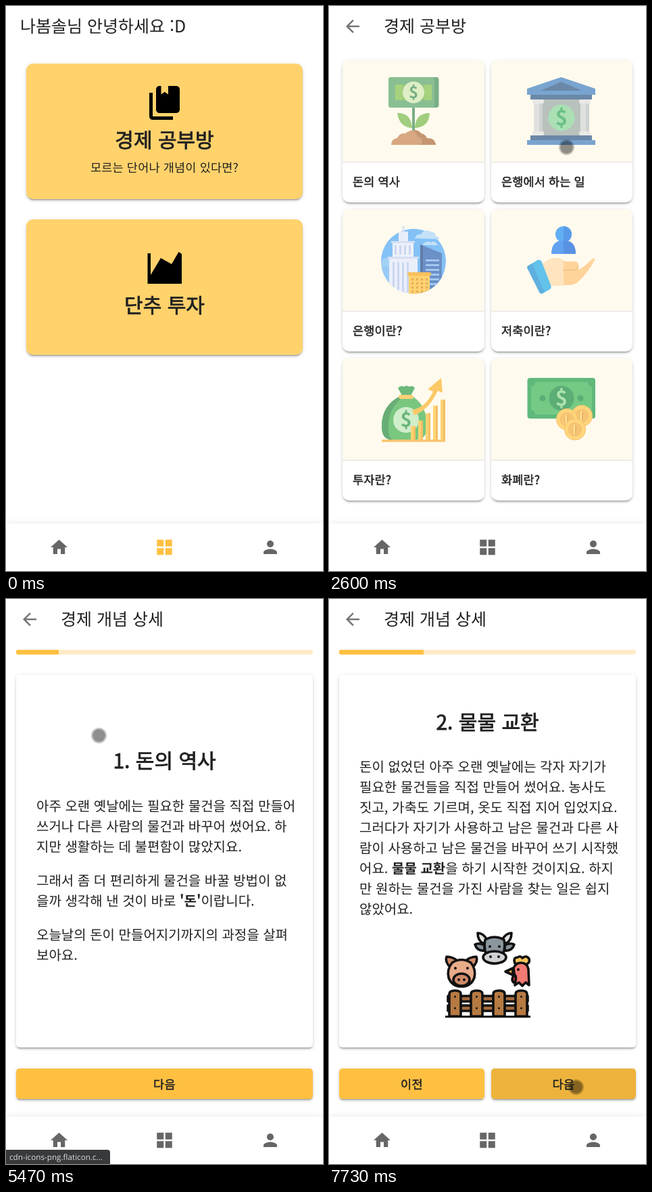
Recreate the animation shown at these times as an HTML page. Size 469 px wide and 834 px high, loop 8 s.

```html
<!DOCTYPE html>
<html lang="ko">
<head>
<meta charset="utf-8">
<style>
html, body { margin: 0; width: 100%; height: 100%; overflow: hidden; background: #fff; }
#stage { position: relative; width: 469px; height: 834px; overflow: hidden; background: #fff; text-rendering: geometricPrecision; }
#stage div, #stage svg { position: absolute; }
#stage svg { left: 0; top: 0; width: 469px; height: 834px; }
.screen { left: 0; top: 0; width: 469px; height: 834px; }
.box { overflow: hidden; box-sizing: border-box; }
.up, .btn { box-shadow: 0 3.75px 1.25px -2.5px #0003, 0 2.5px 2.5px #00000024, 0 1.25px 6.25px #0000001f; }
.btn { border-radius: 5px; background: #ffc042; }
.ripple { border-radius: 50%; background: #000; }
text { font-family: "Noto Sans CJK KR", "Noto Sans KR", "Noto Sans CJK", sans-serif; fill: #212121; text-rendering: geometricPrecision; }
.mid { text-anchor: middle; }
.medium { stroke: #212121; stroke-width: .028em; }
#nav { left: 0; top: 764px; width: 469px; height: 70px; background: #fff; box-shadow: 0 0 10px #0000001a; }
#status { left: 0; top: 813px; width: 154px; height: 21px; background: #38393b; border-top-right-radius: 4px; }
#status span { position: absolute; left: 5px; top: 3px; font: 11.7px/16px "Open Sans", sans-serif; color: #dcdcdc; white-space: nowrap; }
#cursor { width: 23px; height: 23px; border-radius: 50%; box-sizing: border-box;
  border: 2px solid #00000038; background: #00000070; background-clip: padding-box; }
</style>
</head>
<body>
<div id="stage"></div>
<script>
const stage = document.getElementById('stage');
const box = (x, y, w, h, cls = '', css = '', inner = '') =>
  `<div class="box ${cls}" style="left:${x}px;top:${y}px;width:${w}px;height:${h}px;${css}">${inner}</div>`;
const text = (x, y, size, str, cls = '', extra = '') =>
  `<text x="${x}" y="${y}" font-size="${size}" class="${cls}" ${extra}>${str}</text>`;
const rect = (x, y, w, h, fill, r = 0, extra = '') =>
  `<rect x="${x}" y="${y}" width="${w}" height="${h}" rx="${r}" fill="${fill}" ${extra}/>`;
const disc = (x, y, r, fill, extra = '') => `<circle cx="${x}" cy="${y}" r="${r}" fill="${fill}" ${extra}/>`;
const path = (d, fill, extra = '') => `<path d="${d}" fill="${fill}" ${extra}/>`;
const line = (d, color, w) => path(d, 'none', `stroke="${color}" stroke-width="${w}"`);
const icon = (x, y, k, d, fill, id = '') => `<path id="${id}" transform="translate(${x} ${y}) scale(${k})" d="${d}" fill="${fill}"/>`;
const dollar = (x, y, size, fill) => text(x, y + size * .36, size, '$', 'mid', `font-weight="700" style="fill:${fill}"`);
const svg = s => `<svg viewBox="0 0 469 834">${s}</svg>`;
const screen = (id, html) => `<div class="screen" id="${id}">${html}</div>`;
const ripple = id => `<div class="ripple" id="${id}"></div>`;
const back = icon(20, 15, 1.25, 'M20 11H7.83l5.59-5.59L12 4l-8 8 8 8 1.41-1.41L7.83 13H20z', '#757575');

const home = screen('home',
  box(30, 85, 409, 200, 'up', 'background:#ffd26c;border-radius:10px', ripple('ripHome')) +
  box(30, 315, 409, 200, 'up', 'background:#ffd26c;border-radius:10px') +
  svg(text(21, 39, 25, '나봄솔님 안녕하세요 :D') +
    icon(204.5, 113, 2.5, 'M3 6h2v14h12v2H5c-1.1 0-2-.9-2-2zM9 2h1v5l2.1-1.5 2.1 1.5V2H19c1.1 0 2 .9 2 2v12c0 1.1-.9 2-2 2H9c-1.1 0-2-.9-2-2V4c0-1.1.9-2 2-2z', '#000') +
    text(234.5, 209, 30, '경제 공부방', 'mid medium') +
    text(234.5, 244.5, 17.5, '모르는 단어나 개념이 있다면?', 'mid', 'letter-spacing=".187"') +
    path('M209.500 365h4.500v32l15-25 16 9 10.500-18 4.500 3v44h-50.500z', '#000') +
    text(234.5, 453, 30, '단추 투자', 'mid medium')));

const plant =
  rect(88, 105, 74.5, 45, '#3f8f58', 4) + rect(88, 105, 68, 45, '#57a56c', 4) +
  rect(98, 116, 54, 23, '#82c14c') + rect(109, 116, 32, 23, '#6fb04c') +
  disc(125, 127.5, 16, '#d0e8b4') + dollar(125, 127.5, 24, '#3f8f58') +
  rect(123, 150, 4, 37, '#3f8f58') +
  path('M123 180q-19-1-22-22q20-1 22 22zM127 180q1-22 22-22q-1 21-22 22z', '#78b94e') +
  path('M92 205q0-9 9-10q3-8 12-7q11-9 23 0q6 1 9 7q12 0 13 10z', '#c68452') +
  path('M125 183q8 0 11 5q6 1 9 7q12 0 13 10h-22q5-9-4-12z', '#ab6a3c');

const bank =
  path('M343.500 105L394 122v9H293v-9z', '#3f7fc3') + path('M343.500 112L374 125h-61z', '#2b578a') +
  rect(298, 131, 91, 7, '#2b578a') + rect(312, 138, 63, 53, '#9ba8a8') +
  [301, 370].map(x => rect(x + 2, 138, 13, 53, '#d3d5d8') + rect(x + 10, 138, 5, 53, '#bcc0c6') +
    rect(x, 138, 17, 6, '#e0e1e4', 2) + rect(x, 185, 17, 6, '#e0e1e4', 2)).join('') +
  disc(344, 165, 19.5, '#86d59b') + dollar(344, 165, 31, '#2ba45a') +
  rect(298, 191, 91, 7, '#2b578a') + rect(293, 198, 101, 7, '#3f7fc3');

const rows = (x, y, w, n, gap, color, h = 2) =>
  Array.from({ length: n }, (_, i) => rect(x, y + i * gap, w, h, color)).join('');
const city =
  '<clipPath id="round"><path d="M60 300h130v77h-17a48 48 0 0 1-96 0h-17z"/></clipPath><g clip-path="url(#round)">' +
  disc(125, 377, 48, '#4fa8f8') +
  path('M127 343q2-7 9-6q5-9 14-4q8 0 8 7q5 0 5 4zM138 353q6-8 13-4q5-4 10 4z', '#a9d6fb') +
  path('M77 378q5-9 14-7v18H78z', '#7cc0fa') + rect(77, 385, 15, 40, '#6db5f8') +
  rect(108.500, 325, 3, 12, '#c5d7fa') + rect(103, 333, 14, 16, '#dfe8ff') +
  rect(94, 347, 31, 27, '#e6edff') + rect(92, 347, 35, 3, '#c3d3f7') +
  rect(89, 370, 42, 55, '#e2eaff') + rect(87, 370, 46, 3, '#c3d3f7') +
  [97, 104, 111, 118].map(x => rect(x, 353, 3, 14, '#b5c8f2') + rect(x - 3, 378, 3, 45, '#b5c8f2')).join('') +
  path('M135 352l32 13v60h-32z', '#2d62b8') + path('M135 352l4 1.500v72h-4z', '#1c458c') +
  rows(143, 374, 20, 6, 7, '#7eb1ee', 3) +
  rect(118, 395, 31, 30, '#ffbf3b') + rect(116, 393, 35, 5, '#f2a51f', 2) +
  [122, 129, 136, 143].map(x => rows(x, 402, 3, 4, 6, '#d98c18', 3)).join('') + '</g>';

const hand =
  disc(347, 337, 12, '#1e8df5') + path('M347 325a12 12 0 0 1 0 24z', '#1472e6') +
  path('M329 366q0-20 18-20t18 20z', '#1e7cf2') + path('M347 346q18 0 18 20h-18z', '#1463dd') +
  path('M316 381q9-9 19-9q8 0 14 5h14q7 0 6 7q-1 5-7 5h-16l20 0q8-1 14-7l9-8q5-4 4 1q-9 17-21 29q-7 8-17 8h-27z', '#ffc377') +
  path('M316 381q9-9 19-9q8 0 12 4v37h-19z', '#ffdcab') +
  line('M346 390h17q5-1 6-6', '#e9a75c', 1.5) +
  path('M293.500 387q-1-3 2-4l13-8q4-1 6 2l14 36q1 4-3 6l-9 5q-3 2-5-1z', '#1fa9e8') +
  path('M293.500 387q-1-3 2-4l5-3 18 42-2 2q-3 2-5-1z', '#1a90d8');

const bars = [[121, 620], [132, 612], [143, 601], [154, 590], [165, 581]]
  .map(([x, y]) => rect(x, y, 7, 640 - y, '#fdc23c') + rect(x + 4, y, 3, 640 - y, '#efa52b')).join('');
const bag =
  path('M103 577h22q20 14 20 43q0 20-16 20H92q-14 0-14-20q0-29 25-43z', '#40b14f') +
  path('M103 577h6q-23 20-21 46q0 17 8 17h-4q-14 0-14-20q0-29 25-43z', '#298c43') +
  path('M102 564q4-5 9-2q4-3 8 0q5-3 8 2l-6 11h-13z', '#2f9d48') +
  rect(103, 574, 22, 6, '#fbbd45', 3) + disc(114, 611, 19, '#bce8bb') + dollar(114, 611, 29, '#2c974a') +
  bars + rect(78, 640, 94, 3.500, '#f6ae38') +
  path('M126 604l-3-8q20-3 31-27l-8-3 20-17 2 22-7-3q-14 29-35 36z', '#fbb42f');

const coin = (x, y) => disc(x, y, 16, '#f3ab35') + disc(x, y, 15, '#ffc64b') + disc(x, y, 10.500, '#f3ad3d') +
  rect(x - 2, y - 7, 4, 14, '#ffd878', 1) + rect(x, y - 7, 2, 14, '#e4962c', 1);
const bill =
  rect(293.500, 549, 100.500, 60, '#1a9c49', 4) +
  path('M305 555h78q0 6 6 7v34q-6 1-6 7h-78q0-6-6-7v-34q6-1 6-7z', '#39b556') +
  disc(344, 579, 18.500, '#168c42') + dollar(344, 579, 31, '#8ad993') +
  disc(316, 579, 4.500, '#168c42') + disc(372, 579, 4.500, '#168c42') +
  coin(374, 605) + coin(352, 610) + coin(364, 625);

const titles = ['돈의 역사', '은행에서 하는 일', '은행이란?', '저축이란?', '투자란?', '화폐란?'];
let tiles = '', labels = '';
titles.forEach((s, i) => {
  const x = i % 2 ? 240 : 20, y = 80 + 220 * (i >> 1), w = i % 2 ? 209 : 210;
  tiles += box(x, y, w, 210, 'up', 'background:#fff;border-radius:10px',
    box(0, 0, w, 151, '', 'background:#fffaee;border-bottom:1px solid #dfdfdd') + (i ? '' : ripple('ripTile')));
  labels += text(x + 15, y + 185.5, 17.5, s, 'medium', 'letter-spacing=".125"');
});
const list = screen('list', tiles + svg(back + text(81, 39, 25, '경제 공부방') + labels +
  `<g id="art"><g>${[plant, bank, city, hand, bag, bill].join('</g><g>')}</g></g>`));

const ink = 'stroke="#111" stroke-width="3.6" stroke-linejoin="round"';
const eyes = (x, y, gap) => disc(x - gap, y, 2, '#111') + disc(x + gap, y, 2, '#111');
const cow =
  path('M229 509q-9-4-9-16q8 0 14 10zM261 509q9-4 9-16q-8 0-14 10z', '#e3e3df', ink) +
  path('M230 511q-8-4-14-1q3 10 14 9zM260 511q8-4 14-1q-3 10-14 9z', '#87919a', ink) +
  path('M231 503q14-8 28 0q2 10-1 21q-4 14-13 14t-13-14q-3-11-1-21z', '#8b969d', ink) +
  `<ellipse cx="245" cy="529" rx="17" ry="9" fill="#d0d3d5" ${ink}/>` + eyes(245, 513, 7) + eyes(245, 528, 6);
const pig =
  path('M180 544q-9-8-6-16q10 0 17 7zM212 544q9-8 6-16q-10 0-17 7z', '#cf8a68', ink) +
  path('M182 537q14-9 28 0q8 10 5 22q-5 13-19 13t-19-13q-3-12 5-22z', '#e8ab8a', ink) +
  `<ellipse cx="196" cy="562" rx="12" ry="9" fill="#cf8a68" ${ink}/>` + eyes(196, 545, 9) + eyes(196, 562, 4);
const hen =
  path('M275 538q-3-9 4-9q4-3 7 1q6-5 10 1q2 7-6 9z', '#f8c65c', ink) +
  path('M273 545q3-8 11-8q9 0 11 9l1 24-5-4-5 5-5-5-6 4q2-9-1-18z', '#f27a72', ink) +
  path('M272 545l-11 5 11 5z', '#f6ab45', ink) + path('M273 556q-4 7 0 10q5-2 3-10z', '#d93f43', ink) + disc(280, 547, 2, '#111');
const fence =
  rect(176, 586, 118, 8, '#a5693c', 0, ink) + rect(176, 600, 118, 8, '#a5693c', 0, ink) +
  [178, 210, 243, 276].map(x => path(`M${x} 616v-33q0-5 8.500-5t8.500 5v33z`, '#b67a42', ink) + disc(x + 8.500, 587, 1.5, '#111') + disc(x + 8.500, 604, 1.5, '#111')).join('') +
  rect(172, 615, 126, 3, '#111');

const lines = (rows, y0) => rows.map(([s, dy]) => text(45, y0 + dy, 20, s)).join('');
const bold = s => `<tspan font-weight="700">${s}</tspan>`;
const page1 = lines([
  ['아주 오랜 옛날에는 필요한 물건을 직접 만들어', 0],
  ['쓰거나 다른 사람의 물건과 바꾸어 썼어요. 하', 30],
  ['지만 생활하는 데 불편함이 많았지요.', 60],
  ['그래서 좀 더 편리하게 물건을 바꿀 방법이 없', 110],
  [`을까 생각해 낸 것이 바로 ${bold("'돈'")}이랍니다.`, 140],
  ['오늘날의 돈이 만들어지기까지의 과정을 살펴', 190],
  ['보아요.', 220]], 313);
const page2 = lines([
  '돈이 없었던 아주 오랜 옛날에는 각자 자기가',
  '필요한 물건들을 직접 만들어 썼어요. 농사도',
  '짓고, 가축도 기르며, 옷도 직접 지어 입었지요.',
  '그러다가 자기가 사용하고 남은 물건과 다른 사',
  '람이 사용하고 남은 물건을 바꾸어 쓰기 시작했',
  `어요. ${bold('물물 교환')}을 하기 시작한 것이지요. 하지`,
  '만 원하는 물건을 가진 사람을 찾는 일은 쉽지',
  '않았어요.'].map((s, i) => [s, i * 30]), 255);
const label = (x, s) => text(x, 722.5, 17.5, s, 'mid medium', 'letter-spacing=".5"');

const detail = screen('detail',
  box(15, 75, 439, 7, '', 'background:#ffebc8;border-radius:3px', '<div id="bar" style="height:7px;background:#ffc042"></div>') +
  box(15, 112, 439, 550, 'up', 'background:#fff;border-radius:5px') +
  svg(back + text(81, 39, 25, '경제 개념 상세')) +
  screen('first', box(15, 693, 439, 45, 'btn', '', ripple('ripFirst')) +
    svg(text(234.5, 250, 30, '1. 돈의 역사', 'mid medium') + page1 + label(234.5, '다음'))) +
  screen('second', box(15, 693, 215, 45, 'btn') + box(240, 693, 214, 45, 'btn', '', ripple('ripSecond')) +
    svg(text(234.5, 193, 30, '2. 물물 교환', 'mid medium') + page2 + label(122.5, '이전') + label(347, '다음') +
      `<g id="farm">${cow + pig + hen + fence}</g>`)));

const nav = '<div id="nav"></div>' + svg(
  icon(63.5, 784, 1.25, 'M10 20v-6h4v6h5v-8h3L12 3 2 12h3v8z', '#666') +
  icon(219.5, 784, 1.25, 'M3 3h8v8H3zM13 3h8v8h-8zM3 13h8v8H3zM13 13h8v8h-8z', '#666', 'grid') +
  icon(376, 784, 1.25, 'M12 12c2.21 0 4-1.79 4-4s-1.79-4-4-4-4 1.79-4 4 1.79 4 4 4zm0 2c-2.67 0-8 1.34-8 4v2h16v-2c0-2.66-5.33-4-8-4z', '#666'));

stage.innerHTML = home + list + detail + nav +
  '<div id="status"><span>cdn-icons-png.flaticon.c...</span></div><div id="cursor"></div>';

const $ = id => document.getElementById(id);
const ramp = (t, a, b) => Math.min(1, Math.max(0, (t - a) / (b - a)));
const mix = (a, b, p) => a + (b - a) * p;
const show = (id, on) => { $(id).style.display = on ? '' : 'none'; };

// cubic-bezier(.4, 0, .2, 1)
function ease(p) {
  let lo = 0, hi = 1, u;
  for (let i = 0; i < 20; i++) {
    u = (lo + hi) / 2;
    if (1.2 * u * (1 - u) ** 2 + .6 * u * u * (1 - u) + u ** 3 < p) lo = u; else hi = u;
  }
  return 3 * u * u * (1 - u) + u ** 3;
}

function spread(id, t, start, x, y, full) {
  const p = ease(ramp(t, start, start + 550)), r = full * p;
  Object.assign($(id).style, {
    left: x - r + 'px', top: y - r + 'px', width: 2 * r + 'px', height: 2 * r + 'px', opacity: .04 + .03 * p
  });
}

const OPEN = 2133, DETAIL = 5330, NEXT = 7260;
const touches = [ // from, to, x, y, then move: from, to, x, y
  [1400, 4600, 351.5, 208.5, 2870, 3130, 354.5, 227.5],
  [5130, 5670, 137.5, 201.5, 0, 1, 137.5, 201.5],
  [6600, 8000, 358.5, 707.5, 7130, 7400, 365.5, 720.5]];

function draw(t) {
  show('home', t < OPEN);
  show('list', t >= OPEN && t < DETAIL);
  show('detail', t >= DETAIL);
  show('first', t < NEXT);
  show('second', t >= NEXT);
  show('farm', t >= 7730);

  spread('ripHome', t, 1990, 321, 123, 345);
  spread('ripTile', t, 5180, 117, 121, 170);
  spread('ripFirst', t, 6940, 341, 16, 344);
  spread('ripSecond', t, 6940, 116, 16, 344);

  const g = ease(ramp(t, OPEN - 10, OPEN + 240));
  $('grid').setAttribute('fill', `rgb(${mix(255, 102, g)},${mix(192, 102, g)},${mix(66, 102, g)})`);
  $('art').style.opacity = ramp(t, 2210, 2770);
  $('bar').style.width = 439 * mix(1, 2, ramp(t, NEXT, NEXT + 400)) / 7 + 'px';
  $('status').style.opacity = ramp(t, 5370, 5460) * (1 - ramp(t, 5700, 5930));

  const c = touches.find(([a, b]) => t >= a && t < b);
  show('cursor', c);
  if (c) {
    const p = ramp(t, c[4], c[5]);
    $('cursor').style.left = mix(c[2], c[6], p) - 11.5 + 'px';
    $('cursor').style.top = mix(c[3], c[7], p) - 11.5 + 'px';
  }
}

const began = performance.now();
function tick() {
  draw((performance.now() - began) % 8000);
  requestAnimationFrame(tick);
}
tick();
</script>
</body>
</html>
```
